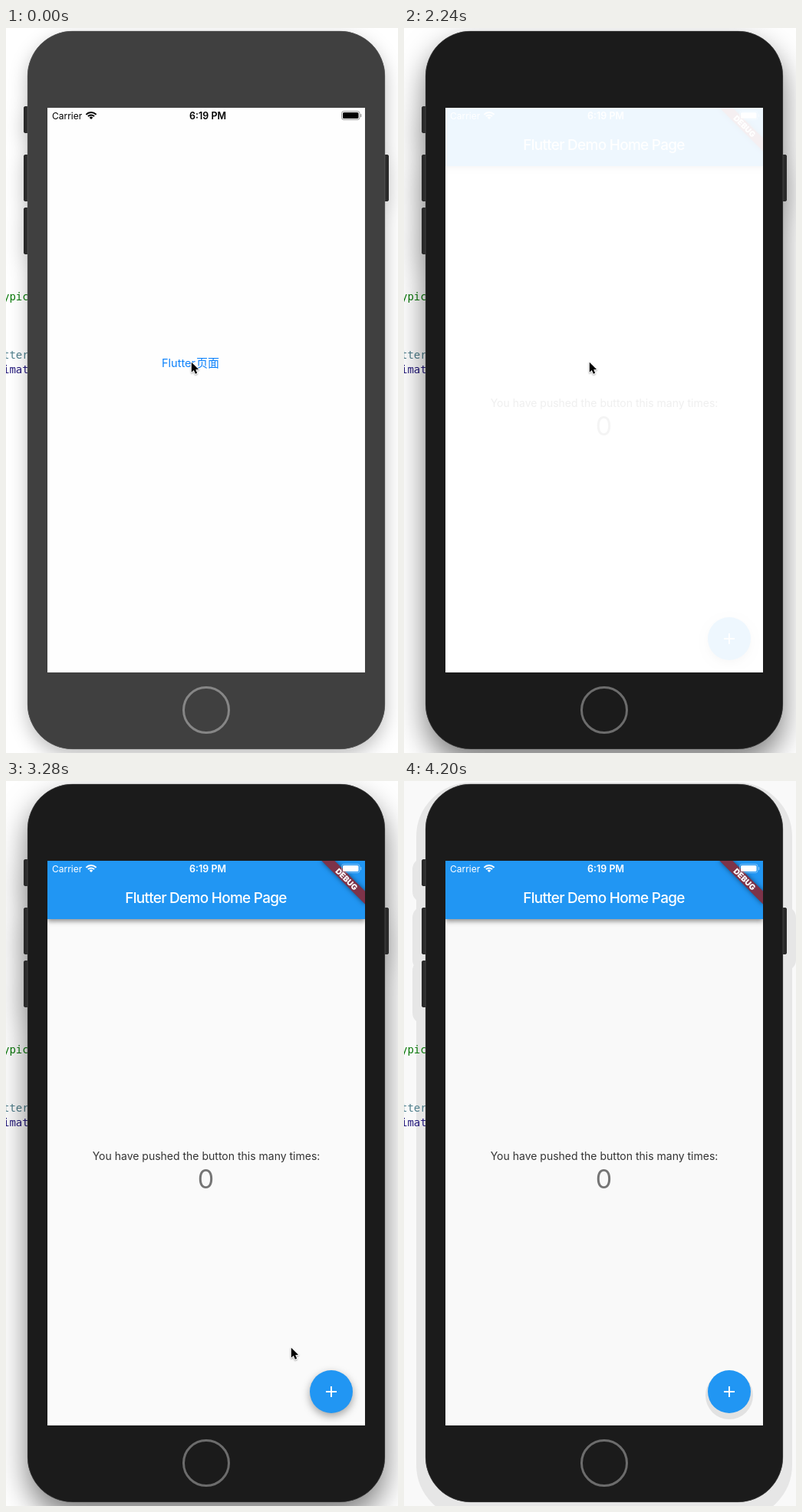
These frames come from a looping animation (511 px wide and 945 px high, 4300 ms). An HTML page with a canvas:

```html
<!DOCTYPE html>
<html lang="en">
<head>
<meta charset="utf-8">
<title>Phone demo</title>
<style>
  html, body { margin: 0; width: 100%; height: 100%; overflow: hidden; background: #fff; }
  canvas { display: block; }
</style>
</head>
<body>
<canvas id="stage" width="511" height="945"></canvas>
<script>
const ctx = document.getElementById('stage').getContext('2d');
const LOOP = 4300;
const SANS = 'Inter, "Noto Sans", sans-serif';
const CJK = '"Noto Sans CJK SC", "Noto Sans CJK", sans-serif';
const MONO = '"DejaVu Sans Mono", monospace';
const SCREEN = { x: 54, y: 104, w: 414, h: 736 };
const BLUE = '#2196f3';

// Pointer stops: [start time, x, y]
const POINTER = [
  [0, 241, 435], [3280, 371, 738], [3430, 390, 776],
  [3580, 462, 911], [3730, 480, 944]
];
const POINTER_GONE = 3880;

// Side buttons: [x, y, height]
const SIDE_BUTTONS = [[23, 102, 35], [23, 165, 61], [23, 234, 61], [489, 165, 61]];

function rect(color, x, y, w, h, r = 0) {
  ctx.fillStyle = color;
  ctx.beginPath();
  ctx.roundRect(x, y, w, h, r);
  ctx.fill();
}

function disc(color, x, y, r) {
  ctx.fillStyle = color;
  ctx.beginPath();
  ctx.arc(x, y, r, 0, Math.PI * 2);
  ctx.fill();
}

function text(str, x, y, font, color, align = 'left', spacing = 0) {
  ctx.font = font;
  ctx.fillStyle = color;
  ctx.textAlign = align;
  ctx.letterSpacing = spacing + 'px';
  ctx.fillText(str, x, y);
}

function shadow(alpha, blur, dy) {
  ctx.shadowColor = `rgba(0,0,0,${alpha})`;
  ctx.shadowBlur = blur;
  ctx.shadowOffsetY = dy;
}

function scoped(draw) {
  ctx.save();
  draw();
  ctx.restore();
}

function phoneOutline() {
  const path = new Path2D();
  path.roundRect(28, 4, 466, 936, 59);
  for (const [x, y, h] of SIDE_BUTTONS) path.roundRect(x, y, 10, h, 3);
  return path;
}
const OUTLINE = phoneOutline();

function drawBackdrop(flat) {
  rect(flat ? '#f9f9f9' : '#fff', 0, 0, 511, 945);
  if (flat) scoped(() => {
    ctx.translate(0, 10);
    ctx.strokeStyle = '#e6e6e6';
    ctx.lineWidth = 24;
    ctx.lineJoin = 'round';
    ctx.stroke(OUTLINE);
  });
  const font = '14px ' + MONO;
  text('ypic', -4, 355, font, '#0b7a0b');
  text('tter', -4, 431, font, '#4f7f8c');
  text('imat', -4, 450, font, '#23187c');
}

function drawPhone(active, flat) {
  scoped(() => {
    if (!flat) {
      if (active) shadow(0.52, 38, 18);
      else shadow(0.26, 24, 9);
    }
    ctx.fillStyle = '#2a2a2a';
    ctx.fill(OUTLINE);
  });
  for (const [x, y, h] of SIDE_BUTTONS) rect('#2a2a2a', x, y, 10, h, 3);
  rect(active ? '#1b1b1b' : '#404040', 28, 4, 466, 936, 59);
  ctx.strokeStyle = 'rgba(130,130,130,0.35)';
  ctx.lineWidth = 1;
  ctx.stroke();
  ctx.strokeStyle = active ? '#6c6c6c' : '#868686';
  ctx.lineWidth = 3;
  ctx.beginPath();
  ctx.arc(261, 889, 29.5, 0, Math.PI * 2);
  ctx.stroke();
}

function drawStatusBar(color) {
  text('Carrier', 60, 119, '12px ' + SANS, color);
  text('6:19 PM', 263, 119, '600 12.5px ' + SANS, color, 'center');

  // Wi-Fi: two arcs above a wedge
  ctx.strokeStyle = ctx.fillStyle = color;
  ctx.lineWidth = 2;
  for (const r of [9, 5.6]) {
    ctx.beginPath();
    ctx.arc(111, 119, r, -Math.PI * 0.76, -Math.PI * 0.24);
    ctx.stroke();
  }
  ctx.beginPath();
  ctx.moveTo(111, 119);
  ctx.arc(111, 119, 3.2, -Math.PI * 0.76, -Math.PI * 0.24);
  ctx.fill();

  scoped(() => {
    ctx.globalAlpha = 0.4;
    ctx.lineWidth = 1;
    ctx.beginPath();
    ctx.roundRect(437.5, 108.5, 23.5, 11, 2.8);
    ctx.stroke();
    rect(color, 462, 112, 1.3, 4, 0.6);
  });
  rect(color, 439, 110, 20.5, 8, 1.6);
}

function drawStartPage(labelColor) {
  rect('#fefefe', SCREEN.x, SCREEN.y, SCREEN.w, SCREEN.h);
  if (!labelColor) return;
  text('Flutter', 203, 442, '14.5px ' + SANS, labelColor);
  text('页面', 248, 442, '15px ' + CJK, labelColor);
}

function drawBanner() {
  ctx.translate(SCREEN.x + SCREEN.w, SCREEN.y);
  ctx.rotate(Math.PI / 4);
  scoped(() => {
    shadow(0.5, 6, 0);
    rect('#7d3349', -40, 28, 80, 12);
  });
  text('DEBUG', 0, 37.7, '900 10.2px ' + SANS, '#fff', 'center');
}

function drawCounterPage(flat) {
  const { x, y, w, h } = SCREEN;
  rect(flat ? '#f9f9f9' : '#fafafa', x, y, w, h);
  if (!flat) rect('#fefefe', x, 836, w, 4);

  scoped(() => {
    shadow(0.42, 6, 3);
    rect(BLUE, x, y, w, 76);
  });
  text('Flutter Demo Home Page', 260.5, 159, '500 19px ' + SANS, '#fff', 'center', -0.73);
  text('You have pushed the button this many times:', 261, 494, '14px ' + SANS, '#333', 'center');
  text('0', 260.5, 530.5, '34px ' + SANS, '#757575', 'center');

  if (flat) disc('#e2e2e2', 424, 801, 31);
  scoped(() => {
    if (!flat) shadow(0.36, 11, 4);
    disc(BLUE, 424, 796, 28);
  });
  rect('#fff', 417, 795, 14, 2);
  rect('#fff', 423, 789, 2, 14);
  scoped(drawBanner);
}

function drawPointer(t) {
  if (t >= POINTER_GONE) return;
  const [, x, y] = POINTER.findLast(([start]) => t >= start);
  ctx.translate(x + 0.8, y + 0.8);
  ctx.beginPath();
  ctx.moveTo(0, 0);
  ctx.lineTo(0, 13);
  ctx.lineTo(3, 10.3);
  ctx.lineTo(5.1, 15);
  ctx.lineTo(7.4, 14);
  ctx.lineTo(5.4, 9.5);
  ctx.lineTo(9.3, 9.2);
  ctx.closePath();
  ctx.lineJoin = 'round';
  ctx.lineWidth = 1.8;
  ctx.strokeStyle = '#fff';
  scoped(() => {
    shadow(0.35, 2, 1);
    ctx.stroke();
  });
  ctx.fillStyle = '#000';
  ctx.fill();
}

function render(t) {
  const active = t >= 1350;
  const opened = t >= 2240;
  const fading = opened && t < 2390;
  const flat = t >= 4200;

  drawBackdrop(flat);
  drawPhone(active, flat);

  scoped(() => {
    ctx.beginPath();
    ctx.rect(SCREEN.x, SCREEN.y, SCREEN.w, SCREEN.h);
    ctx.clip();
    if (opened) drawCounterPage(flat);
    else drawStartPage(!active ? '#0d82fb' : t < 1790 ? '#cde5fd' : null);
    if (fading) rect('rgba(255,255,255,0.92)', SCREEN.x, SCREEN.y, SCREEN.w, SCREEN.h);
    drawStatusBar(opened ? '#fff' : '#000');
  });
  scoped(() => drawPointer(t));
}

function tick() {
  render(performance.now() % LOOP);
  requestAnimationFrame(tick);
}
tick();
</script>
</body>
</html>
```
